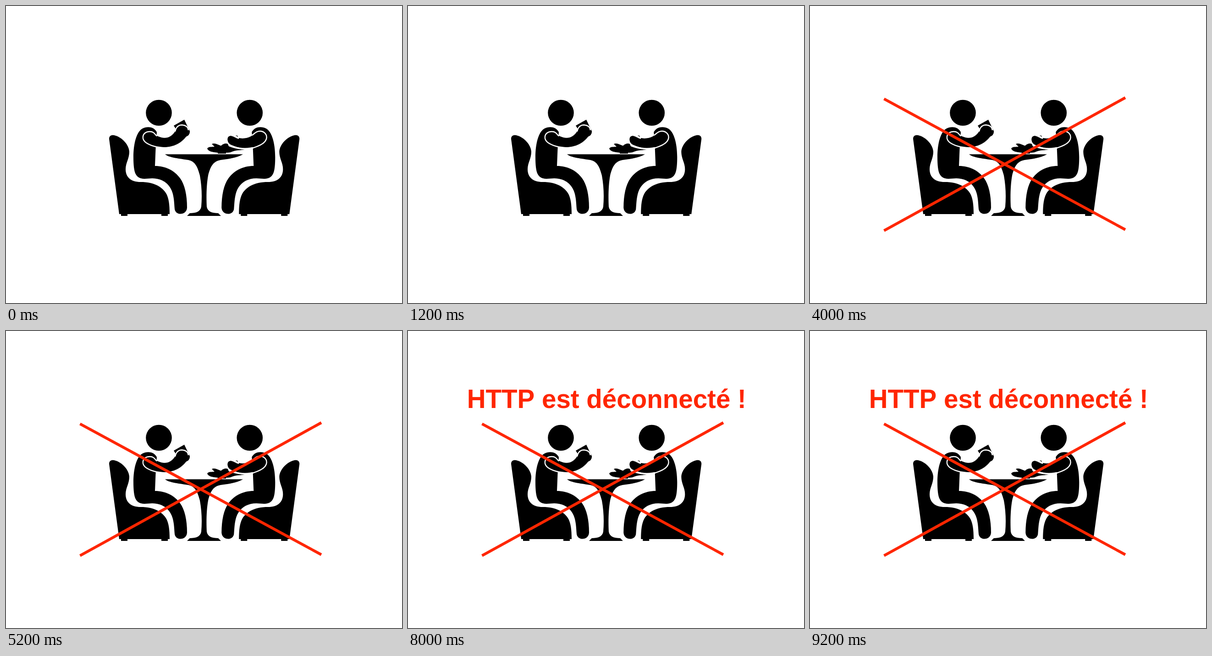
Recreate the animation shown at these times as an HTML page. Size 864x648 px, loop 10 s.

```html
<!DOCTYPE html>
<html lang="fr">
<head>
<meta charset="utf-8">
<title>Déconnecté</title>
<style>
html, body { margin: 0; width: 100%; height: 100%; overflow: hidden; background: #fff; }
svg { display: block; width: 864px; height: 648px; }
svg, .rim, .slash, .cross, text { animation: 10s step-end infinite; }
svg { animation-name: ground; }
.rim { fill: none; stroke-width: 2.4; animation-name: rim; }
.slash, .cross { stroke: #ff2600; stroke-width: 6; }
.slash { animation-name: slash; }
.cross { animation-name: cross; }
text { font: bold 56.5px "Liberation Sans", Arial, sans-serif; font-kerning: none; text-anchor: middle; fill: #ff2600; }
.first { animation-name: first; }
.second { animation-name: second; }
@keyframes ground { 0%, 40%, 100% { background: #fff; } 20% { background: #ececec; } }
@keyframes rim { 0%, 40%, 100% { stroke: #fff; } 20% { stroke: #ececec; } }
@keyframes slash {
  0% { stroke: #5f5f5f; opacity: 0; }
  20% { stroke: #5f5f5f; opacity: 1; }
  40%, 100% { stroke: #ff2600; opacity: 1; }
}
@keyframes cross { 0% { opacity: 0; } 40%, 100% { opacity: 1; } }
@keyframes first { 0%, 80%, 100% { opacity: 0; } 60% { opacity: 1; } }
@keyframes second { 0% { opacity: 0; } 80%, 100% { opacity: 1; } }
</style>
</head>
<body>
<svg viewBox="0 0 864 648">
  <defs>
    <g id="diner">
      <path d="M225 290C225 283 230 281 236 282C251 285 268 301 269 318C269 333 261 342 261 356C261 374 273 384 294 384C322 384 341 394 350 410C355 420 357 432 357 454H353V458H339V454H265V458H251V454H247Z"/>
      <circle cx="333.5" cy="233" r="28.3"/>
      <path d="M329 275C323 264 312 263 304 265C285 268 278 300 278 330C278 345 279 355 281 362C284 372 291 377 302 377L319 376C343 376 359 390 364 410C367 422 367 432 368 443C370 458 394 457 395 440C395 412 390 390 380 376C367 358 347 349 325 349L327 300Z"/>
    </g>
  </defs>
  <use href="#diner"/>
  <use href="#diner" transform="translate(865.3) scale(-1 1)"/>
  <!-- table -->
  <path d="M347 323.5H517C505 331 485 334 468 336C452 339 446 350 441 370C437 392 437 420 438 438C440 449 450 452 463 452L469 458H395L401 452C414 452 424 449 426 438C428 415 427 392 423 370C418 350 412 339 398 336C380 333 355 331 347 323.5Z"/>
  <!-- cup and plate -->
  <path d="M366 261L389 248L401 273Q402 283 390 286L371 269Z"/>
  <path d="M439 311C442 306 449 308 455 307L449 301C456 298 463 303 469 305C474 300 480 299 484 301L486 306C495 310 506 313 522 313C510 315 499 315 493 318C489 320 484 320 480 320V322H462V320C450 319 441 317 439 311Z"/>
  <path d="M501 282L505 283L506 286Z"/>
  <!-- arms, edged where they overlap -->
  <path d="M299 290C298 279 305 274 314 274C323 275 326 282 331 284C346 291 359 288 368 275C372 263 378 260 385 260C398 261 403 272 396 281C384 299 366 308 345 308C325 307 301 300 299 290Z"/>
  <path class="rim" d="M329 284C325 280 323 274 314 274C305 274 297.5 279 299 289C301 299 315 304 327 307M369 274C371 264 377 259.5 384 259.5C392 260 397 264 398 271"/>
  <path d="M569 287C569 276 561 273 553 273C544 273 541 280 535 284C522 291 508 290 496 284C488 280 481 287 482 294C484 302 490 304 497 306C522 314 548 308 562 298C567 294 569 291 569 287Z"/>
  <path class="rim" d="M537 282C542 279 545 273 554 273C562 273 569.5 279 568.5 288C567 300 550 306 538 310M508 289C502 288 497 282 490 282C484 282 481 288 482.5 294C484 302 490 304 498 307C505 309 512 311.5 522 312.5"/>
  <path class="slash" d="M161.5 202.7L688 488"/>
  <path class="cross" d="M161.5 490.2L688 200"/>
  <text class="first" x="433.3" y="168">Pas chez HTTP</text>
  <text class="second" x="433.3" y="168">HTTP est déconnecté !</text>
</svg>
</body>
</html>
```
